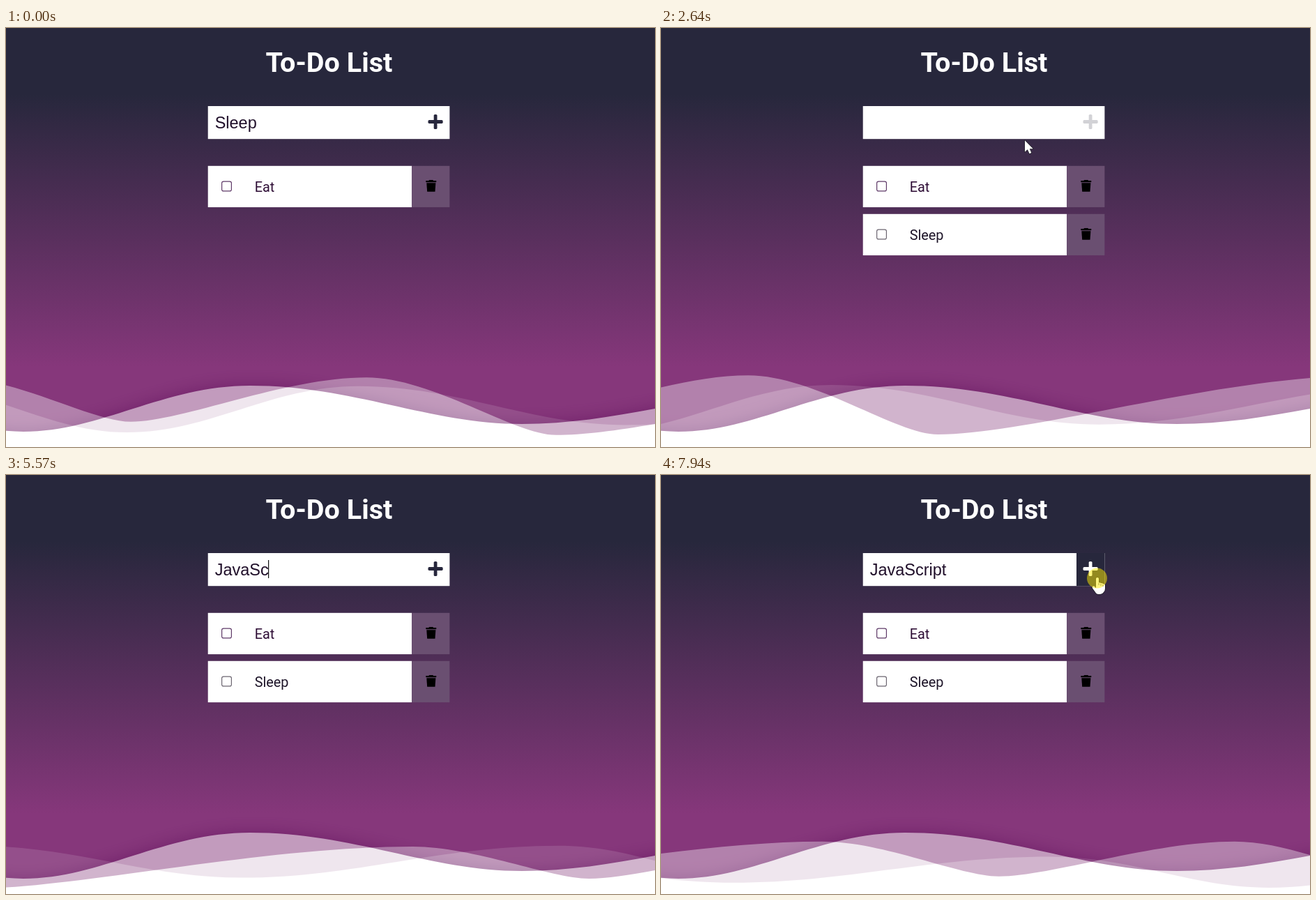
These frames come from a looping animation (931x601 px, 8000 ms). An HTML page with a canvas:

```html
<!DOCTYPE html>
<html lang="en">
<head>
<meta charset="utf-8">
<title>To-Do List</title>
<style>
  html, body { margin: 0; width: 100%; height: 100%; overflow: hidden; background: #27273c; }
  canvas { display: block; }
</style>
</head>
<body>
<canvas id="stage" width="931" height="601"></canvas>
<script>
const W = 931, H = 601, LOOP = 8000;
const ctx = document.getElementById('stage').getContext('2d');
const buffer = document.createElement('canvas');
buffer.width = W;
buffer.height = H;
const layerCtx = buffer.getContext('2d');

const DARK = '#27273c';
const BASE = 616;        // waves scale from this line
const PERIOD = 1484;     // width of one wave image
const WAVE_START = 1450; // ms at which both moving waves restart

// Turning points as [x, height above BASE], trough and crest in turn.
const BOTTOM = { points: [[30, 39.4], [362, 112], [746, 51], [1200, 112]], trough: 0.36, crest: 0.38 };
const MIDDLE = { points: [[-36, 59], [302, 132], [574, 37], [1195, 132]], trough: 0.22, crest: 0.35 };
const TOP = { points: [[25, 37], [350, 103], [740, 48], [1194, 103]], trough: 0.34, crest: 0.38 };

const MOVES = [
  { start: 650, end: 1430, until: 2500, from: [760, 480], to: [628, 141] },
  { start: 2500, end: 2750, until: 2750, from: [628, 141], to: [440, 177] },
  { start: 6950, end: 7450, until: LOOP, from: [740, 26], to: [626, 147] }
];
const HOVERS = [[1400, 2560], [7400, LOOP]];
const CLICKS = [[2000, 2200], [7870, LOOP]];
const ADDED = 2150, FOCUS = 3050, BLUR = 7870, FADE = 500;
const WORDS = [{ text: 'Java', start: 4150 }, { text: 'Script', start: 5250 }];
const KEY_GAP = 180;

const clamp = v => Math.min(1, Math.max(0, v));
const lerp = (a, b, k) => a + (b - a) * k;
const within = (t, [a, b]) => t >= a && t < b;
const isHovered = t => HOVERS.some(span => within(t, span));

const sky = layerCtx.createLinearGradient(0, 95, 0, 486);
sky.addColorStop(0, DARK);
sky.addColorStop(1, '#86377b');

// The CSS "ease" curve, solved by bisection.
function ease(x) {
  const bez = (s, a, b) => 3 * s * (1 - s) ** 2 * a + 3 * s * s * (1 - s) * b + s ** 3;
  let lo = 0, hi = 1;
  for (let i = 0; i < 20; i++) {
    const mid = (lo + hi) / 2;
    if (bez(mid, 0.25, 0.25) < x) lo = mid; else hi = mid;
  }
  return bez(lo, 0.1, 1);
}

// Level at every turning point; trough and crest set how round each bend is.
function wavePath(c, { points, trough, crest }, shift, scale) {
  const place = i => {
    const n = points.length, [x, h] = points[(i + n) % n];
    return [x + Math.floor(i / n) * PERIOD - shift, BASE - h * scale];
  };
  const first = -points.length, last = points.length * 3;
  c.beginPath();
  c.moveTo(place(first)[0], BASE + 100);
  c.lineTo(...place(first));
  for (let i = first; i < last; i++) {
    const [x0, y0] = place(i), [x1, y1] = place(i + 1), d = x1 - x0;
    const [a, b] = i % 2 ? [crest, trough] : [trough, crest];
    c.bezierCurveTo(x0 + d * a, y0, x1 - d * b, y1, x1, y1);
  }
  c.lineTo(place(last)[0], BASE + 100);
  c.closePath();
}

// Every layer is sky plus wave, blended as one group.
function drawLayer(wave, opacity, shift, scale, shadow) {
  const c = layerCtx;
  c.fillStyle = sky;
  c.fillRect(0, 0, W, H);
  c.save();
  if (shadow) {
    c.shadowColor = 'rgba(80,0,80,.8)';
    c.shadowBlur = 22;
  }
  wavePath(c, wave, shift, scale);
  c.fillStyle = '#fff';
  c.fill();
  c.restore();
  ctx.globalAlpha = opacity;
  ctx.drawImage(buffer, 0, 0);
  ctx.globalAlpha = 1;
}

function movingLayer(wave, opacity, duration, t) {
  const u = ((t - WAVE_START) / duration + 1) % 1;
  drawLayer(wave, opacity, u * PERIOD, 0.55 + 0.45 * Math.abs(1 - 2 * u));
}

function rect(x, y, w, h, color) {
  ctx.fillStyle = color;
  ctx.fillRect(x, y, w, h);
}

function roundRect(x, y, w, h, r, color) {
  ctx.fillStyle = color;
  ctx.beginPath();
  ctx.roundRect(x, y, w, h, r);
  ctx.fill();
}

function text(str, x, y, font, color) {
  ctx.font = font;
  ctx.fillStyle = color;
  ctx.fillText(str, x, y);
}

const TRASH = new Path2D('M13.3 24.3H26.4L25.5 36.7H14.2Z');

function drawItem(label, y, color, boxColor) {
  rect(289.7, y - 0.2, 292.4, 59.3, '#fff');
  rect(582, y - 0.2, 54.4, 59.3, '#6a4f71');
  ctx.strokeStyle = boxColor;
  ctx.lineWidth = 1.2;
  ctx.beginPath();
  ctx.roundRect(309.6, y + 22.1, 13.8, 13.8, 2.5);
  ctx.stroke();
  text(label, 356.7, y + 36.7, '19.8px Roboto, sans-serif', color);
  roundRect(606.5, y + 20, 6.5, 3, 1, '#000');
  roundRect(602.3, y + 21, 15, 2.2, 0.6, '#000');
  ctx.save();
  ctx.translate(590, y);
  ctx.fill(TRASH);
  ctx.restore();
}

// 0 = resting plus, 1 = fully highlighted plus.
function plusLight(t) {
  let light = 0;
  for (const [a, b] of HOVERS) {
    if (t >= a) light = ease(clamp((t - a) / FADE)) * (1 - ease(clamp((t - b) / FADE)));
  }
  return light;
}

function typing(t) {
  let value = '', lastKey = FOCUS;
  for (const word of WORDS) {
    if (t < word.start) break;
    const n = Math.min(word.text.length, Math.floor((t - word.start) / KEY_GAP) + 1);
    value += word.text.slice(0, n);
    lastKey = word.start + (n - 1) * KEY_GAP;
  }
  return { value, lastKey };
}

function drawInput(t) {
  rect(289.7, 112, 346.7, 47.2, '#fff');
  if (isHovered(t)) rect(596, 112, 40.4, 47.2, DARK);

  const typed = typing(t);
  const value = t < ADDED ? 'Sleep' : typed.value;
  text(value, 299.7, 143.5, '23.47px "Liberation Sans", Arial, sans-serif', '#200f2a');
  const focused = t >= FOCUS && t < BLUR;
  if (focused && (t - typed.lastKey) % 1000 < 500) {
    rect(Math.round(299.7 + ctx.measureText(value).width) - 1, 122, 1.2, 26, '#111');
  }

  const k = plusLight(t);
  const [r, g, b] = [39, 39, 60].map(v => Math.round(lerp(v, 255, k)));
  const color = `rgb(${r},${g},${b})`;
  const size = 21.2, bar = 4.8, cx = 616.1, cy = 134.5;
  roundRect(cx - size / 2, cy - bar / 2, size, bar, 1.6, color);
  roundRect(cx - bar / 2, cy - size / 2, bar, size, 1.6, color);
}

const ARROW = new Path2D('M0 0V16.5L3.8 13L6.6 19L9.4 17.8L6.8 12H11.8Z');
const HAND = new Path2D('M-2 1.8Q-2 0 0 0Q2 0 2 1.8V7.5Q4 6.6 5 8.3Q7 7.4 8 9.2' +
  'Q11 8.6 11 11.2V16Q11 19 9 21Q7 24 3 24H1.5Q-1.5 24 -3 21L-7 15.5' +
  'Q-8 13.5 -6.6 12.6Q-5 11.8 -3.6 13.4L-2 15Z');

function drawCursor(t) {
  const move = MOVES.find(m => t >= m.start && t < m.until);
  if (!move) return;
  const k = clamp((t - move.start) / (move.end - move.start));
  const [x, y] = move.from.map((v, i) => lerp(v, move.to[i], k));
  const hand = isHovered(t);
  ctx.save();
  ctx.translate(x, y);
  ctx.lineJoin = 'round';
  ctx.lineWidth = 1.4;
  ctx.strokeStyle = '#1a1722';
  ctx.fillStyle = '#fff';
  const shape = hand ? HAND : ARROW;
  ctx.stroke(shape);
  ctx.fill(shape);
  if (hand) {
    ctx.lineWidth = 0.6;
    ctx.beginPath();
    for (let i = 0; i < 3; i++) {
      ctx.moveTo(2 + 3 * i, 8 + i);
      ctx.lineTo(2 + 3 * i, 11 + i);
    }
    ctx.stroke();
  }
  ctx.restore();
  if (CLICKS.some(span => within(t, span))) {
    ctx.fillStyle = 'rgba(255,235,0,.5)';
    ctx.beginPath();
    ctx.arc(x - 0.5, y + 1, 14.5, 0, Math.PI * 2);
    ctx.fill();
  }
}

function draw(t) {
  movingLayer(BOTTOM, 1, 15000, t);
  movingLayer(MIDDLE, 0.75, 10000, t);
  drawLayer(TOP, 0.5, 0, 1, true);

  ctx.textAlign = 'center';
  text('To-Do List', 463.5, 63, 'bold 39.6px Roboto, sans-serif', '#fff');
  ctx.textAlign = 'left';
  drawInput(t);
  drawItem('Eat', 198, '#2e0d35', '#5f3a68');
  if (t >= ADDED) drawItem('Sleep', 267, '#1d1428', '#6c6671');
  drawCursor(t);
}

const start = performance.now();
function tick() {
  draw((performance.now() - start) % LOOP);
  requestAnimationFrame(tick);
}
tick();
</script>
</body>
</html>
```
